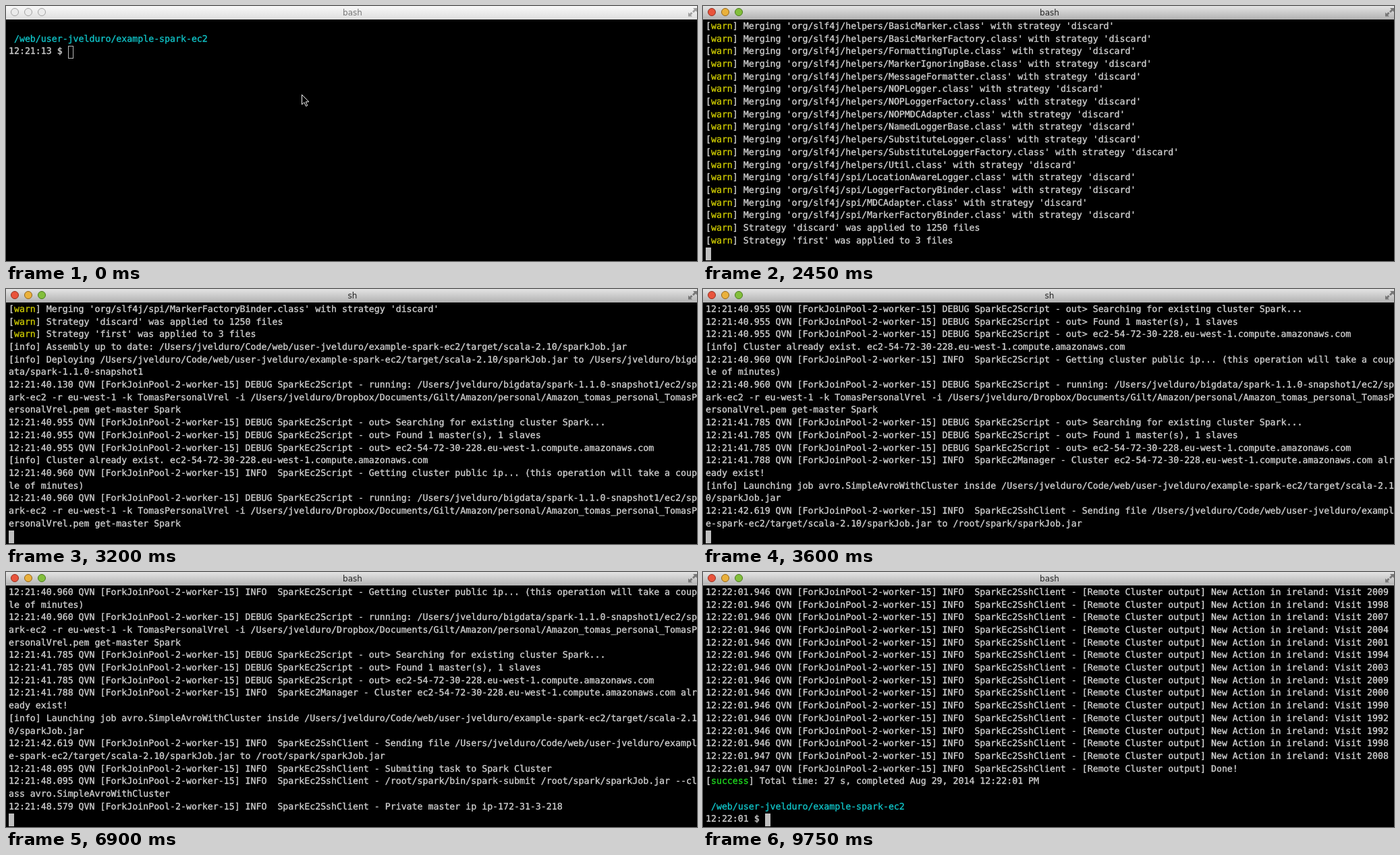
An HTML page for the animation above (9800 ms loop, 1024 by 378 pixels).

```html
<!DOCTYPE html>
<html lang="en">
<head>
<meta charset="utf-8">
<title>Terminal</title>
<style>
html, body { margin: 0; width: 100%; height: 100%; overflow: hidden; background: #000; }
#bar, #screen, #cursor, #mouse { position: absolute; }
#bar { left: 0; top: 0; width: 1024px; height: 20px; }
#screen {
  left: 4px; top: 21.8px; margin: 0; color: #d0d0d0;
  font: 13.24px/18.71px "DejaVu Sans Mono", monospace;
  text-rendering: geometricPrecision; font-variant-ligatures: none;
  -webkit-text-stroke: .35px;
}
#cursor { width: 8px; height: 19px; box-sizing: border-box; background: #bfbfbf; }
#cursor.hollow { background: none; border: 1px solid #b8b8b8; }
#mouse { left: 437px; top: 130px; }
.path { color: #10c4c8; }
.warn { color: #cbc800; }
.success { color: #1fd81f; }
#title { font: 12px "DejaVu Sans", sans-serif; text-anchor: middle; }
</style>
</head>
<body>
<svg id="bar" viewBox="0 0 1024 20">
  <defs>
    <linearGradient id="on" x2="0" y2="1"><stop stop-color="#e4e4e4"/><stop offset="1" stop-color="#b2b2b2"/></linearGradient>
    <linearGradient id="off" x2="0" y2="1"><stop stop-color="#f8f8f8"/><stop offset="1" stop-color="#dedede"/></linearGradient>
  </defs>
  <rect id="fill" width="1024" height="20"/>
  <g id="lights"><circle cx="13" cy="9" r="5.5"/><circle cx="33" cy="9" r="5.5"/><circle cx="53" cy="9" r="5.5"/></g>
  <text id="title" x="513.5" y="13.5"></text>
  <path id="expand" d="M1018 3h6v6l-2-2-3 3-2-2 3-3zM1011 9.500v6h6l-2-2 2.500-2.500-2-2-2.500 2.500z"/>
</svg>
<pre id="screen"></pre>
<div id="cursor"></div>
<svg id="mouse" width="14" height="21"><path d="M1.5 1.5v14.5l3.4-3.2 2.6 5.7 2.2-1-2.5-5.5h4.6z" fill="#000" stroke="#f4f4f4"/></svg>
<script>
const LOOP = 9800, ROWS = 19, COLS = 128, CELL = 7.97, PITCH = 18.71;
const CMD = 'sbt sparkLaunchCluster';
const ACTIVE = 100, TYPE_FROM = 200, TYPE_TO = 1000;
const $ = id => document.getElementById(id);

const home = '/Users/jvelduro';
const project = '/web/user-jvelduro/example-spark-ec2';
const code = home + '/Code' + project;
const jar = code + '/target/scala-2.10/sparkJob.jar';
const spark = home + '/bigdata/spark-1.1.0-snapshot1';
const host = 'ec2-54-72-30-228.eu-west-1.compute.amazonaws.com';
const getMaster = `running: ${spark}/ec2/spark-ec2 -r eu-west-1 -k TomasPersonalVrel -i ${home}` +
  '/Dropbox/Documents/Gilt/Amazon/personal/Amazon_tomas_personal_TomasPersonalVrel.pem get-master Spark';

// Output as [time in ms, text]
const events = [];
const print = (at, text) => events.push([at, text + '\n']);
const prompt = (at, clock) => events.push([at, `\n ${project}\n${clock} $ `]);
const clockToMs = sec => 4950 + (sec - 48.095) * 250;

function log(sec, level, name, msg) {
  const min = 21 + Math.floor(sec / 60);
  const s = (sec % 60).toFixed(3).padStart(6, '0');
  print(clockToMs(sec), `12:${min}:${s} QVN [ForkJoinPool-2-worker-15] ${level.padEnd(5)} SparkEc2${name} - ${msg}`);
}
const info = (sec, msg) => print(clockToMs(sec), '[info] ' + msg);
const script = (sec, msg) => log(sec, 'DEBUG', 'Script', msg);
const ssh = (sec, msg) => log(sec, 'INFO', 'SshClient', msg);
const merge = (at, dir, names) => names.split(' ').forEach((n, i) =>
  print(at + i * 15, `[warn] Merging 'org/slf4j/${dir}${n}.class' with strategy 'discard'`));
function found(sec) {
  script(sec, 'out> Searching for existing cluster Spark...');
  script(sec, 'out> Found 1 master(s), 1 slaves');
  script(sec, 'out> ' + host);
}

prompt(0, '12:21:13');
print(1100, '');
print(1450, `[info] Loading project definition from ${code}/project`);
print(1700, `[info] Set current project to example-spark-ec2 (in build file:${code}/)`);
merge(1800, '', 'ILoggerFactory IMarkerFactory Logger LoggerFactory MDC Marker MarkerFactory');
merge(1910, 'helpers/', 'BasicMDCAdapter BasicMarker BasicMarkerFactory FormattingTuple MarkerIgnoringBase ' +
  'MessageFormatter NOPLogger NOPLoggerFactory NOPMDCAdapter NamedLoggerBase SubstituteLogger SubstituteLoggerFactory Util');
merge(2150, 'spi/', 'LocationAwareLogger LoggerFactoryBinder MDCAdapter MarkerFactoryBinder');
print(2300, "[warn] Strategy 'discard' was applied to 1250 files");
print(2300, "[warn] Strategy 'first' was applied to 3 files");
print(2550, '[info] Assembly up to date: ' + jar);
print(2600, `[info] Deploying ${jar} to ${spark}`);
script(40.13, getMaster);
found(40.955);
info(40.958, 'Cluster already exist. ' + host);
log(40.96, 'INFO', 'Script', 'Getting cluster public ip... (this operation will take a couple of minutes)');
script(40.96, getMaster);
found(41.785);
log(41.788, 'INFO', 'Manager', `Cluster ${host} already exist!`);
info(41.79, 'Launching job avro.SimpleAvroWithCluster inside ' + jar);
ssh(42.619, `Sending file ${jar} to /root/spark/sparkJob.jar`);
ssh(48.095, 'Submiting task to Spark Cluster');
ssh(48.095, '/root/spark/bin/spark-submit /root/spark/sparkJob.jar --class avro.SimpleAvroWithCluster');
ssh(48.579, 'Private master ip ip-172-31-3-218');
const remote = (sec, msg) => ssh(sec, '[Remote Cluster output] ' + msg);
[2009, 1998, 2007, 2004, 2001, 1994, 2003, 2009, 2000, 1990, 1992, 1992, 1998, 2008].forEach((year, i) =>
  remote(i < 13 ? 61.946 : 61.947, 'New Action in ireland: Visit ' + year));
remote(61.947, 'Done!');
print(8450, '[success] Total time: 27 s, completed Aug 29, 2014 12:22:01 PM');
prompt(8500, '12:22:01');

function rowsAt(t) {
  const typed = Math.round(CMD.length * Math.min(1, Math.max(0, (t - TYPE_FROM) / (TYPE_TO - TYPE_FROM))));
  const text = events.filter(e => e[0] <= t)
    .map((e, i) => e[1] + (i ? '' : CMD.slice(0, typed))).join('');
  return text.split('\n')
    .flatMap(line => line.match(new RegExp(`.{1,${COLS}}`, 'g')) || [''])
    .slice(-ROWS);
}

const paint = row => row
  .replace(/^ \/web.*/, '<span class="path">$&</span>')
  .replace(/^\[(warn|success)\]/, '[<span class="$1">$1</span>]');

function drawBar(active, title) {
  $('fill').setAttribute('fill', active ? 'url(#on)' : 'url(#off)');
  $('title').textContent = title;
  $('title').setAttribute('fill', active ? '#222' : '#777');
  $('expand').setAttribute('fill', active ? '#777' : '#a0a0a0');
  const tints = ['#e9543c', '#eab13c', '#83bf3c'], rims = ['#923222', '#91651c', '#4b7a1e'];
  [...$('lights').children].forEach((c, i) => {
    c.setAttribute('fill', active ? tints[i] : '#ebebeb');
    c.setAttribute('stroke', active ? rims[i] : '#a2a2a2');
  });
}

let shown;
function frame(now) {
  const t = now % LOOP;
  const active = t >= ACTIVE, title = t >= 2950 && t < 4000 ? 'sh' : 'bash';
  const rows = rowsAt(t);
  const state = [active, title, t < TYPE_FROM, ...rows].join('\n');
  if (state !== shown) {
    shown = state;
    drawBar(active, title);
    $('screen').innerHTML = rows.map(paint).join('\n');
    $('cursor').className = active ? '' : 'hollow';
    $('cursor').style.left = 4 + rows.at(-1).length * CELL + 'px';
    $('cursor').style.top = 21.2 + (rows.length - 1) * PITCH + 'px';
    $('mouse').style.display = t < TYPE_FROM ? '' : 'none';
  }
  requestAnimationFrame(frame);
}
frame(0);
</script>
</body>
</html>
```
